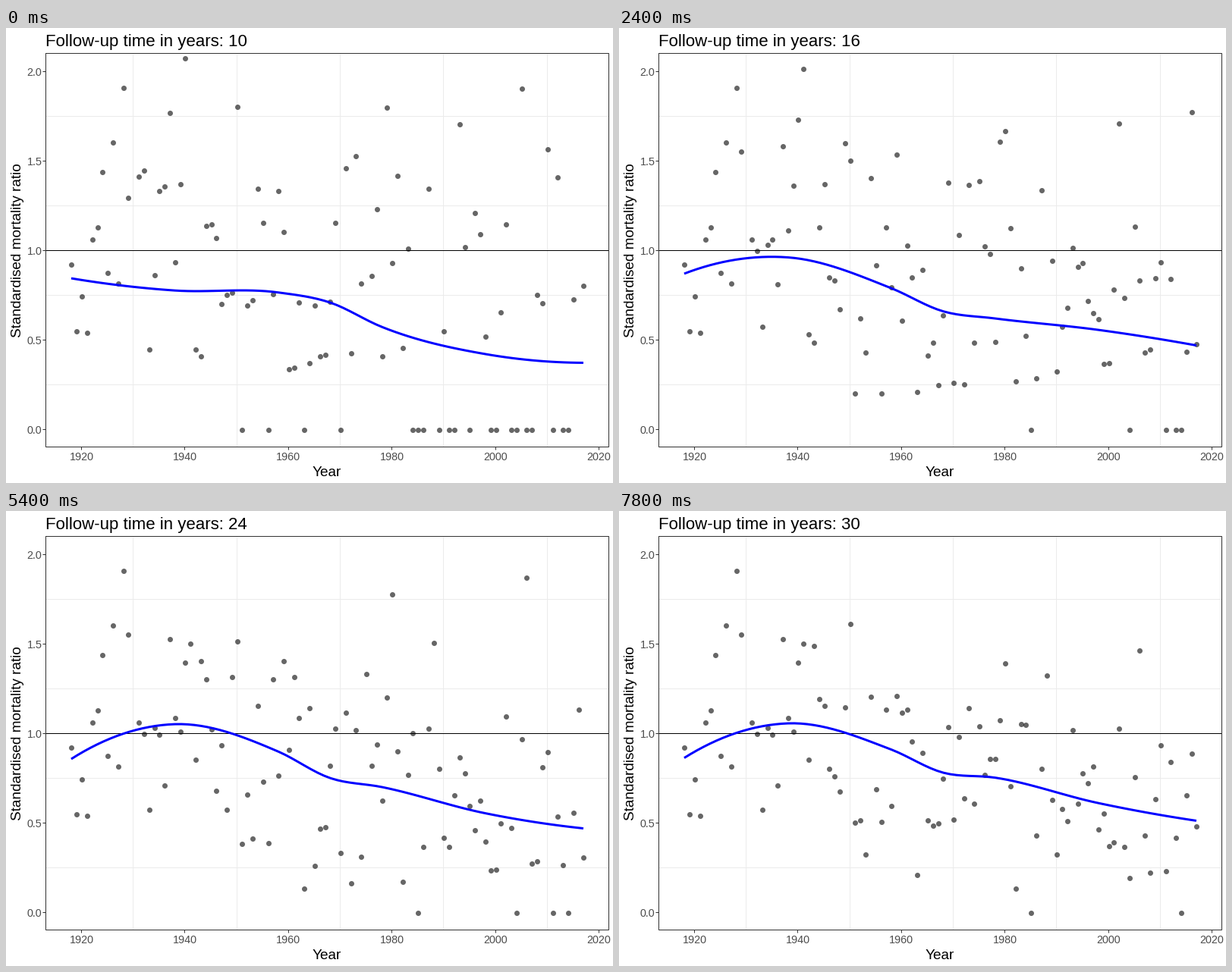
A matplotlib script for the animation above (8000 ms loop, 800 by 600 pixels).

```python
import numpy as np
import matplotlib.pyplot as plt
from matplotlib.animation import FuncAnimation

W, H, DPI = 800, 600, 100
FRAMES, INTERVAL = 40, 200
FOLLOW_UP = np.arange(10, 31)
YEARS = np.arange(1918, 2018)
LEFT, RIGHT, TOP, BOTTOM = 52.5, 794.5, 33.5, 552.5

plt.rcParams["font.family"] = "Liberation Sans"

# Smoothed trend: a few heights along the years, at a few frames
trend_years = [1918, 1938, 1958, 1968, 1978, 1998, 2017]
trend_frames = [0, 4, 12, 23, 39]
trend = np.array([
    [.845, .777, .766, .710, .574, .422, .373],
    [.818, .984, .858, .700, .585, .485, .574],
    [.871, .962, .790, .661, .621, .557, .470],
    [.856, 1.051, .896, .742, .684, .536, .456],
    [.864, 1.057, .911, .782, .754, .612, .513],
])

# The oldest cohorts are already complete and stay put.
settled = [.925, .55, .747, .543, 1.065, 1.133, 1.442, .878, 1.607, .818]


def px(n):
    """Pixels to points."""
    return n * 72 / DPI


def sx(year):
    return 99.6 + (np.asarray(year) - 1920) * 6.818


def sy(ratio):
    return 529.5 - np.asarray(ratio) * 236


def centre(v):
    """Middle of the pixel that holds v."""
    return np.floor(v) + .5


def smooth(x, y, xs):
    """Cubic Hermite curve through the points (x, y)."""
    x = np.asarray(x)
    m = np.gradient(y, x, edge_order=2)
    i = np.clip(np.searchsorted(x, xs, side="right") - 1, 0, len(x) - 2)
    h = x[i + 1] - x[i]
    s = (xs - x[i]) / h
    return ((1 + 2 * s) * (1 - s) ** 2 * y[i] + s * (1 - s) ** 2 * h * m[i]
            + s * s * (3 - 2 * s) * y[i + 1]
            + s * s * (s - 1) * h * m[i + 1])


def cohort(year, risk, rng):
    """Observed over expected deaths of one cohort by follow-up time."""
    lived = np.minimum(FOLLOW_UP, max(year - YEARS[0], 10))
    at_ten = (2.9 - .028 * abs(year - 1957)) * rng.uniform(.9, 1.1)
    expected = at_ten * (lived / 10) ** 1.1
    deaths = rng.exponential(1 / risk, 60).cumsum()
    return np.searchsorted(deaths, expected) / expected


rng = np.random.default_rng(7)
risks = smooth(trend_years, trend[-1], YEARS)
ratios = np.array([cohort(y, r, rng) for y, r in zip(YEARS, risks)])
ratios[:len(settled)] = np.array(settled)[:, None]
key_frames = np.round(np.linspace(0, FRAMES - 1, len(FOLLOW_UP)))

fig = plt.figure(figsize=(W / DPI, H / DPI), dpi=DPI, facecolor="white")
ax = fig.add_axes([0, 0, 1, 1])
ax.set_xlim(0, W)
ax.set_ylim(H, 0)
ax.axis("off")


def line(xs, ys, color, z):
    ax.plot(centre(xs), centre(ys), color=color, lw=px(1), zorder=z,
            snap=False, solid_capstyle="butt", solid_joinstyle="miter")


def label(x, y, s, size, color="black", **kw):
    return ax.text(x, y, s, fontsize=px(size), color=color,
                   va="baseline", **kw)


for year in range(1930, 2011, 20):
    line([sx(year)] * 2, [TOP, BOTTOM], "#ebebeb", 1)
for r in (.25, .75, 1.25, 1.75):
    line([LEFT, RIGHT], [sy(r)] * 2, "#ebebeb", 1)

for year in range(1920, 2021, 20):
    line([sx(year)] * 2, [BOTTOM, BOTTOM + 4], "#333333", 5)
    label(sx(year), 570, str(year), 14.4, "#4d4d4d", ha="center")
for r in (0, .5, 1, 1.5, 2):
    line([LEFT - 4, LEFT], [sy(r)] * 2, "#333333", 5)
    label(47.5, sy(r) + 5.5, f"{r:.1f}", 14.4, "#4d4d4d", ha="right")

line([LEFT, RIGHT], [sy(1)] * 2, "black", 2)
line([LEFT, RIGHT, RIGHT, LEFT, LEFT], [TOP, TOP, BOTTOM, BOTTOM, TOP],
     "#333333", 5)

title = label(52, 24, "", 22.3)
label(422.5, 591, "Year", 19, ha="center")
label(20.5, 293, "Standardised mortality ratio", 19, ha="center",
      rotation=90, rotation_mode="anchor")

dots = ax.scatter(YEARS, YEARS, s=px(7) ** 2, color="black", alpha=.6,
                  linewidths=0, zorder=3)
dots.set_clip_path(plt.Rectangle((LEFT, TOP), RIGHT - LEFT, BOTTOM - TOP,
                                 transform=ax.transData))
curve_years = np.linspace(YEARS[0], YEARS[-1], 80)
curve, = ax.plot(sx(curve_years), sy(np.ones(80)), color="#0000ff",
                 lw=px(3), zorder=4, solid_capstyle="butt")


def draw(k):
    progress = k / (FRAMES - 1)
    years = round(FOLLOW_UP[0] + progress * np.ptp(FOLLOW_UP))
    title.set_text(f"Follow-up time in years: {years}")
    now = [np.interp(k, key_frames, row) for row in ratios]
    dots.set_offsets(np.c_[centre(sx(YEARS)), centre(sy(now))])
    heights = np.array([np.interp(k, trend_frames, col) for col in trend.T])
    curve.set_ydata(sy(smooth(trend_years, heights, curve_years)))
    return title, dots, curve


anim = FuncAnimation(fig, draw, frames=FRAMES, interval=INTERVAL,
                     repeat=True, repeat_delay=0)
plt.show()
```
